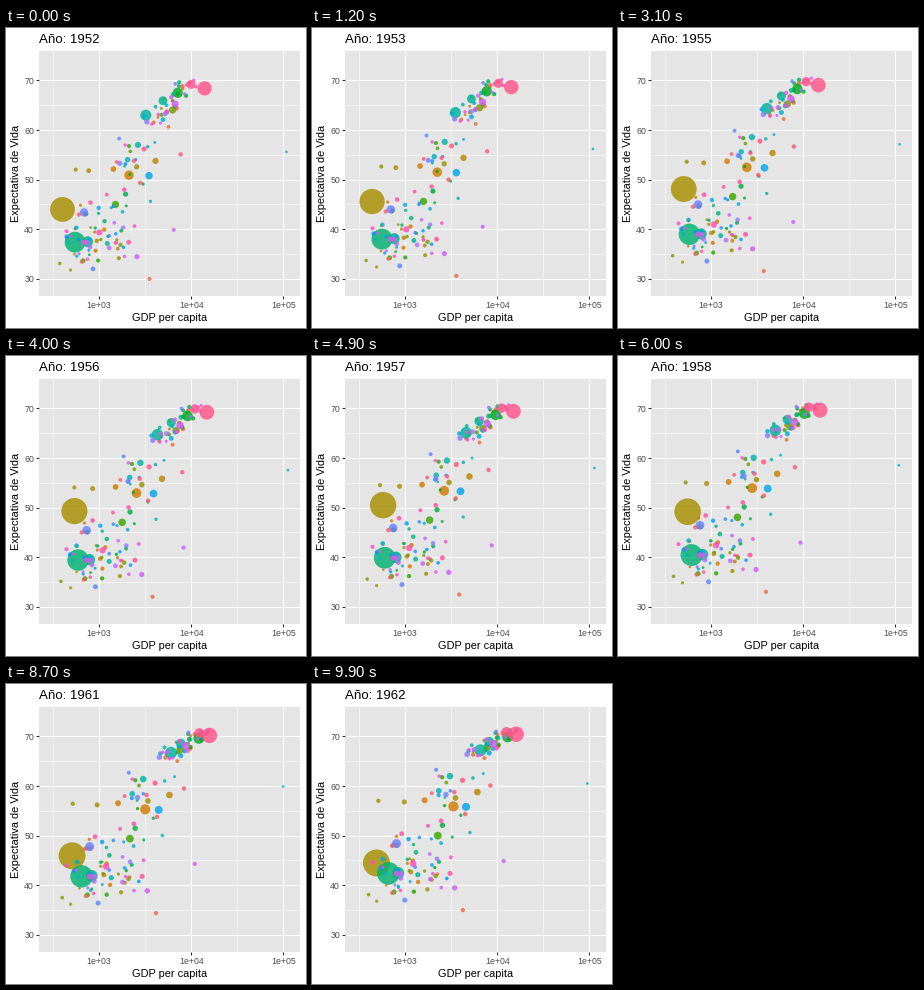
Write a matplotlib script that moves like this. It is 300 by 300 pixels and loops after 10 s.

```python
import numpy as np
import matplotlib.pyplot as plt
from matplotlib.animation import FuncAnimation

plt.rcParams["font.family"] = "Liberation Sans"

FRAMES, MID = 100, 49
COUNTRIES = 142
PX = 0.72                                   # points per pixel at 100 dpi
SIDE = 300
LEFT, RIGHT, TOP, BOTTOM = 33, 294.2, 23, 268

# alphabetical rank, population (millions), GDP, life expectancy, log GDP growth
LANDMARKS = [
    (59, 372, 547, 37.4, 0.08), (135, 158, 13990, 68.4, 0.06),
    (67, 86, 3217, 63.0, 0.31), (60, 82, 750, 37.5, 0.05),
    (48, 69, 7144, 67.5, 0.26), (134, 50, 9980, 69.2, 0.10),
    (15, 57, 2109, 50.9, 0.20), (65, 48, 4931, 65.9, 0.22),
    (98, 41, 685, 43.4, 0.07), (83, 30, 3478, 50.8, 0.12),
    (4, 4, 3521, 30.0, 0.08), (110, 4, 6460, 39.9, 0.26),
    (137, 5, 7690, 55.1, 0.04),
]
# paths that turn in 1957: GDP, life expectancy, population
TURNING = {
    25: [(400, 44.0, 556), (576, 50.5, 637), (488, 44.5, 666)],
    72: [(108382, 55.6, 0.16), (113523, 58.0, 0.21), (95458, 60.5, 0.36)],
}
# income groups: share, mean and spread of log GDP, life, slope, spread
GROUPS = [
    (0.33, 3.74, 0.19, 64.3, 15, 2.0),
    (0.29, 3.25, 0.17, 47.5, 10, 6.0),
    (0.38, 2.90, 0.20, 38.5, 4, 3.6),
]


def hue_color(rank):
    """Evenly spaced CIE-LUV hue, chroma 100, lightness 65, slightly deepened."""
    h = np.radians(15 + 360 * (rank - 1) / COUNTRIES)
    lum, chroma = 65, 100
    u = chroma * np.cos(h) / (13 * lum) + 0.1978
    v = chroma * np.sin(h) / (13 * lum) + 0.4683
    y = ((lum + 16) / 116) ** 3
    x = 9 * y * u / (4 * v)
    z = y * (12 - 3 * u - 20 * v) / (4 * v)
    lin = np.array([[3.2406, -1.5372, -0.4986],
                    [-0.9689, 1.8758, 0.0415],
                    [0.0557, -0.2040, 1.0570]]) @ [x, y, z]
    lin = np.clip(lin, 0, 1)
    rgb = np.where(lin <= 0.0031308, 12.92 * lin,
                   1.055 * lin ** (1 / 2.4) - 0.055)
    return rgb ** 1.25


def build_keys():
    """Return (log GDP, life, population) per country for 1952, 1957, 1962."""
    keys = np.empty((3, COUNTRIES, 3))
    rng = np.random.default_rng(12)

    def add(rank, pop, x, life, growth):
        gain = min(5, 0.4 * (73.5 - life))          # gains level off near 73
        first = np.array([x, life, pop])
        step = np.array([growth, gain, 0.22 * pop]) / 2
        for k in range(3):
            keys[k, rank - 1] = first + k * step

    for rank, pop, gdp, life, growth in LANDMARKS:
        add(rank, pop, np.log10(gdp), life, growth)
    for rank, path in TURNING.items():
        keys[:, rank - 1] = [(np.log10(g), life, pop) for g, life, pop in path]

    used = {row[0] for row in LANDMARKS} | set(TURNING)
    rest = [r for r in range(1, COUNTRIES + 1) if r not in used]
    shares = [g[0] for g in GROUPS]
    for i, rank in enumerate(rng.permutation(rest)):
        group = np.searchsorted(np.cumsum(shares), i / len(rest), side="right")
        _, mean, spread, base, slope, noise = GROUPS[group]
        x = np.clip(rng.normal(mean, spread), 2.48, 4.1)
        life = base + slope * (x - mean) + rng.normal(0, noise)
        pop = np.clip(3.2 * np.exp(rng.normal(0, 1.1)), 0.1, 28)
        growth = rng.normal(0.07 + 0.1 * (x - 2.9), 0.05)
        add(rank, pop, x, np.clip(life, 28.8, 72.6), growth)
    return keys


start, middle, end = build_keys()


def state(i):
    if i <= MID:
        return start + (middle - start) * i / MID
    return middle + (end - middle) * (i - MID) / (FRAMES - 1 - MID)


def areas(pop):
    radius = 1.1 + 12.4 * np.sqrt(pop / 666)
    return (2 * radius * PX) ** 2


def limits(lo, hi):
    pad = 0.05 * (hi - lo)
    return lo - pad, hi + pad


fig = plt.figure(figsize=(3, 3), dpi=100, facecolor="white")
ax = fig.add_axes([LEFT / SIDE, 1 - BOTTOM / SIDE,
                   (RIGHT - LEFT) / SIDE, (BOTTOM - TOP) / SIDE],
                  facecolor="#E5E5E5")
ax.set_xlim(*limits(np.log10(298.9), np.log10(113523)))
ax.set_ylim(*limits(28.8, 73.68))
ax.set_xticks([3, 4, 5], ["1e+03", "1e+04", "1e+05"])
ax.set_xticks([2.5, 3.5, 4.5], minor=True)
ax.set_yticks(range(30, 71, 10))
ax.set_yticks(range(35, 66, 10), minor=True)
ax.set_axisbelow(True)
ax.grid(which="major", color="white", lw=1.07 * PX)
ax.grid(which="minor", color="white", lw=0.53 * PX)
ax.tick_params(which="major", length=2.75 * PX, width=1.07 * PX, pad=2.2 * PX,
               color="#333333", labelcolor="#4D4D4D", labelsize=8.8 * PX)
ax.tick_params(which="minor", length=0)
ax.spines[:].set_visible(False)


def label(x, y, text, size, **kw):
    return fig.text(x / SIDE, 1 - y / SIDE, text, fontsize=size * PX,
                    color="black", va="baseline", rotation_mode="anchor", **kw)


label((LEFT + RIGHT) / 2, 293, "GDP per capita", 11, ha="center")
label(13.5, (TOP + BOTTOM) / 2, "Expectativa de Vida", 11,
      ha="center", rotation=90)
title = label(LEFT, 15, "", 13.2, ha="left")

dots = ax.scatter(start[:, 0], start[:, 1], s=areas(start[:, 2]),
                  c=[hue_color(r) for r in range(1, COUNTRIES + 1)],
                  alpha=0.82, linewidths=0, zorder=3)


def update(i):
    now = state(i)
    dots.set_offsets(now[:, :2])
    dots.set_sizes(areas(now[:, 2]))
    title.set_text(f"Año: {round(1952 + 10 * i / (FRAMES - 1))}")
    return dots, title


anim = FuncAnimation(fig, update, frames=FRAMES, interval=100,
                     repeat=True, repeat_delay=0)
plt.show()
```
